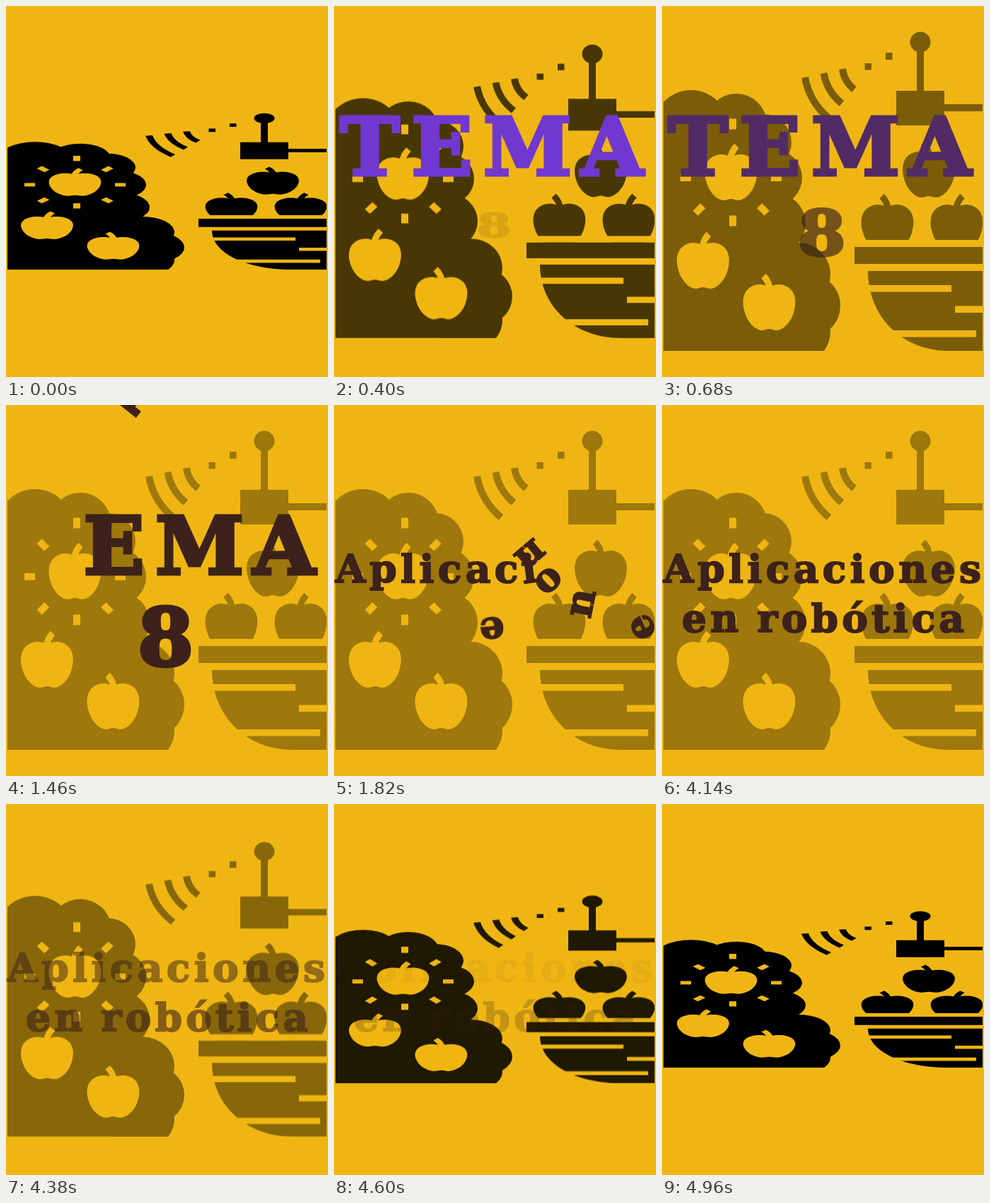
Write an HTML page that moves like this. It is 455x525 px and loops after 5 s.

```html
<!DOCTYPE html>
<html lang="es">
<head>
<meta charset="utf-8">
<style>
html, body { margin: 0; width: 100%; height: 100%; overflow: hidden; background: #efb613; }
svg { display: block; width: 455px; height: 525px; }
text {
  font-family: "DejaVu Serif", "Noto Serif", serif; font-weight: 900;
  text-anchor: middle; stroke-linejoin: miter; fill: #3c221a; stroke: #3c221a;
}
.big { font-size: 113px; stroke-width: 5px; }
.small { font-size: 55px; stroke-width: 2px; }
.hole { fill: #efb613; color: #efb613; }
</style>
</head>
<body>
<svg viewBox="0 0 455 525">
  <defs>
    <clipPath id="frame"><rect x="2" y="30" width="451" height="458"/></clipPath>
    <g id="apple">
      <path fill="currentColor" d="M0-28C-8-33-18-33-25-29C-37-23-39-8-35 6C-31 22-19 33-10 33C-6 33-4 31 0 31C4 31 6 33 10 33C19 33 31 22 35 6C39-8 37-23 25-29C18-33 8-33 0-28Z"/>
      <path fill="none" stroke="currentColor" stroke-width="9" d="M-1-26Q1-37 8-44"/>
    </g>
    <rect id="ray" x="-7.5" y="-5" width="15" height="10"/>
  </defs>
  <g id="art" clip-path="url(#frame)">
    <path d="M2 170H140L160 300L190 380V488H2Z"/>
    <g id="bush"></g>
    <g class="hole">
      <use href="#apple" x="97.5" y="242"/>
      <use href="#apple" x="58" y="367"/>
      <use href="#apple" transform="translate(151.5 426) scale(-1 1)"/>
      <use href="#ray" x="33.5" y="243"/>
      <use href="#ray" x="161.5" y="243"/>
      <use href="#ray" transform="translate(100 167) rotate(90)"/>
      <use href="#ray" transform="translate(100 304) rotate(90)"/>
      <use href="#ray" transform="translate(52.5 198) rotate(45)"/>
      <use href="#ray" transform="translate(143 198) rotate(-45)"/>
      <use href="#ray" transform="translate(52.5 288) rotate(-45)"/>
      <use href="#ray" transform="translate(143 288) rotate(45)"/>
    </g>
    <path fill="none" stroke="#000" stroke-width="10" d="M202 101A98.5 98.5 0 0 0 236 159M228.5 95A72 72 0 0 0 254 138M255 89A45 45 0 0 0 271.5 118"/>
    <path d="M286.500 81h9.500v9.500h-9.500zM316 66h9.500v10h-9.500z"/>
    <circle cx="365" cy="51" r="14.500"/>
    <path d="M360 60h10v60h29v19h54v10h-54v20h-68v-49h29z"/>
    <use href="#apple" transform="translate(377 238) scale(-1 1)"/>
    <use href="#apple" transform="translate(318.500 313) scale(-1 1)"/>
    <use href="#apple" x="416.500" y="313"/>
    <path class="hole" d="M270 331h185v10H270z"/>
    <path d="M272 341h181v24H272zM291 375H453V488H405C340 488 291 440 291 375Z"/>
    <path class="hole" d="M285 395h124v9.500H285zM414 424.500h41v9.500h-41zM320 459h124v9.500H320z"/>
  </g>
  <g id="words"></g>
</svg>
<script>
const $ = id => document.getElementById(id);
const clamp = v => Math.max(0, Math.min(1, v));
const mix = (a, b, p) => a + (b - a) * p;
const span = (t, from, to) => clamp((t - from) / (to - from));
const sine = p => (1 - Math.cos(Math.PI * p)) / 2;

// Cubic Bezier easing (.6, 0, .2, 1), solved by bisection
function settle(x) {
  let lo = 0, hi = 1, s = 0.5;
  for (let i = 0; i < 20; i++) {
    s = (lo + hi) / 2;
    const r = 1 - s;
    if (1.8 * r * r * s + 0.6 * r * s * s + s ** 3 < x) lo = s; else hi = s;
  }
  return s * s * (3 - 2 * s);
}

function add(parent, tag, attrs) {
  const el = document.createElementNS('http://www.w3.org/2000/svg', tag);
  for (const k in attrs) el.setAttribute(k, attrs[k]);
  return $(parent).appendChild(el);
}

for (const [cx, cy, r] of [[41, 172, 53], [105, 167, 43], [143, 193, 40], [158, 243, 40],
  [160, 308, 43], [193, 380, 45], [207, 424, 45], [190, 460, 48]])
  add('bush', 'circle', { cx, cy, r });

function letter(char, cls, y) {
  const el = add('words', 'text', { class: cls, y });
  el.textContent = char;
  return el;
}

function place(el, x, y, turn, sx, sy, alpha) {
  el.setAttribute('transform', `translate(${x} ${y}) rotate(${turn}) scale(${sx} ${sy})`);
  el.setAttribute('opacity', alpha);
}

const title = [['T', 50.5], ['E', 152.5], ['M', 273.5], ['A', 393], ['8', 225.5]]
  .map(([char, x]) => ({ el: letter(char, 'big', 41.5), x, y: char === '8' ? 326.5 : 197 }));

// Spreads the letters of a line evenly between two margins
const subtitle = [];
function setLine(str, left, right, base, fade) {
  const glyphs = [...str].map(char => {
    const el = letter(char, 'small', 15);
    return { el, w: char === ' ' ? 16 : el.getComputedTextLength(), y: base - 15, fade };
  });
  const gap = (right - left - glyphs.reduce((sum, g) => sum + g.w, 0)) / (glyphs.length - 1);
  let x = left;
  for (const g of glyphs) {
    g.x = x + g.w / 2;
    x += g.w + gap;
    subtitle.push(g);
  }
}
setLine('Aplicaciones', 2, 451, 251, 485);
setLine('en robótica', 28, 427, 320.5, 600);

function drawArt(t) {
  const leave = settle(span(t, 4140, 4960));
  const sy = t < 4140 ? mix(0.49, 1, sine(span(t, 0, 540))) : mix(1, 0.49, leave);
  const alpha = t < 4140 ? mix(1, 0.34, span(t, 0, 880)) : mix(0.34, 1, leave);
  $('art').setAttribute('transform', `translate(0 ${262.5 * (1 - sy)}) scale(1 ${sy})`);
  $('art').setAttribute('opacity', alpha);
}

function drawTitle(t) {
  const tint = span(t, 400, 880);
  const color = `rgb(${mix(113, 60, tint)},${mix(56, 34, tint)},${mix(208, 26, tint)})`;
  title.forEach(({ el, x, y }, i) => {
    const last = i === 4;
    const p = last ? span(t, 340, 840) : sine(span(t, 20, 360));
    const sx = mix(0.56, 1, p), sy = mix(0.33, 1, p);
    const out = Math.max(0, (t - 1440 - i * 60) / 20);
    const paint = last ? '#3c221a' : color;
    el.style.fill = el.style.stroke = paint;
    place(el, mix(227, x, sx) + 142 * out, y - 19 * (1 - p) - 228 * out,
      39 * out, sx, sy, out > 4 ? 0 : p);
  });
}

function drawSubtitle(t) {
  subtitle.forEach(({ el, x, y, fade }, i) => {
    const start = 1480 + i * 23.6;
    const p = span(t, start, start + 180);
    const r = 230 * (1 - sine(p)), a = -1.2 + 4 * p;
    const alpha = t <= start ? 0 : 1 - span(t, 4140, 4140 + fade);
    place(el, x + r * Math.cos(a), y + r * Math.sin(a), -270 * (1 - p), 1, 1, alpha);
  });
}

function tick() {
  const t = Math.floor(performance.now() % 5000 / 20) * 20;
  drawArt(t);
  drawTitle(t);
  drawSubtitle(t);
  requestAnimationFrame(tick);
}
tick();
</script>
</body>
</html>
```
